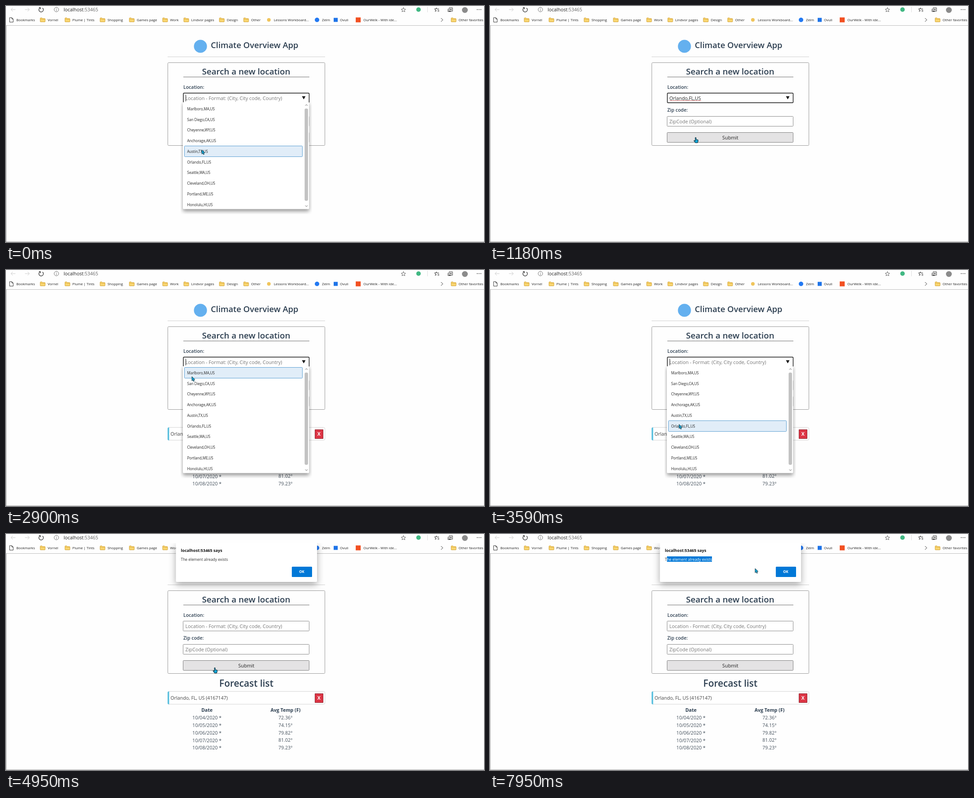
Write an HTML page with a canvas that moves like this. It is 1062 px wide and 527 px high and loops after 8000 ms.

```html
<!DOCTYPE html>
<html lang="en">
<head>
<meta charset="utf-8">
<title>Forecast search</title>
<style>
  html, body { margin: 0; width: 100%; height: 100%; overflow: hidden; background: #fefefe; }
  canvas { display: block; }
</style>
</head>
<body>
<canvas id="stage" width="1062" height="527"></canvas>
<script>
const ctx = document.getElementById('stage').getContext('2d');
const LOOP = 8000, STEP = 150;
const FONT = '"Open Sans", "Noto Sans", sans-serif';
const INK = '#2c3e50', DARK = '#222', BLUE = '#0078d7';

// Stretches of activity: the screen refreshes every STEP ms within each.
const bursts = [[150, 1180], [1330, 1450], [1730, 2750], [2900, 3320], [3590, 4400],
  [4680, 4950], [5510, 5900], [6180, 7140], [7260, 7950]];

// Pointer path: time, x, y
const path = [
  [0, 435, 321], [300, 433, 330], [450, 429, 343], [750, 428, 345], [900, 436, 332],
  [1050, 448, 309], [1180, 456, 294], [1450, 456, 294], [1730, 455, 291], [2180, 419, 221],
  [2480, 412, 206], [2750, 411, 205], [2900, 413, 238], [3200, 419, 330], [3320, 420, 344],
  [3740, 420, 345], [3890, 430, 335], [4190, 462, 301], [4400, 463, 299], [4950, 463, 299],
  [5510, 458, 255], [5660, 440, 150], [5810, 418, 80], [5900, 411, 60], [6180, 408, 59],
  [6480, 393, 57], [6630, 393, 57], [7140, 463, 57], [7410, 498, 58], [7860, 585, 76], [7950, 589, 77]
];

const cities = ['Marlboro,MA', 'San Diego,CA', 'Cheyenne,WY', 'Anchorage,AK', 'Austin,TX',
  'Orlando,FL', 'Seattle,WA', 'Cleveland,OH', 'Portland,ME', 'Honolulu,HI'];
const temps = ['72.36', '74.15', '79.82', '81.02', '79.23'];
const folders = [[76, 'Vornel'], [131, 'Plume | Tints'], [209, 'Shopping'], [274, 'Games page'],
  [348, 'Work'], [395, 'Lindvor pages'], [474, 'Design'], [528, 'Other'], [989, 'Other favorites']];

const within = (t, a, b) => t >= a && t < b;

function refreshTime(t) {
  let last = 0;
  for (const [start, end] of bursts) {
    if (t >= end) last = end;
    else if (t >= start) last = start + STEP * Math.floor((t - start) / STEP);
  }
  return last;
}

function pointerAt(t) {
  const i = path.findIndex(p => p[0] > t);
  if (i < 0) return path[path.length - 1].slice(1);
  const [t0, x0, y0] = path[i - 1], [t1, x1, y1] = path[i];
  const k = (t - t0) / (t1 - t0);
  return [x0 + (x1 - x0) * k, y0 + (y1 - y0) * k];
}

function text(s, x, y, size, color = DARK, weight = 400, align = 'left') {
  ctx.font = `${weight} ${size}px ${FONT}`;
  ctx.textAlign = align;
  ctx.textBaseline = 'alphabetic';
  ctx.fillStyle = color;
  ctx.fillText(s, x, y + size * 0.36);
}

function box(x, y, w, h, fill, stroke, radius = 0, line = 1) {
  ctx.beginPath();
  ctx.roundRect(x, y, w, h, radius);
  if (fill) { ctx.fillStyle = fill; ctx.fill(); }
  if (stroke) { ctx.strokeStyle = stroke; ctx.lineWidth = line; ctx.stroke(); }
}

function disc(x, y, r, color) {
  ctx.beginPath();
  ctx.arc(x, y, r, 0, Math.PI * 2);
  ctx.fillStyle = color;
  ctx.fill();
}

function shape(d, x, y, stroke, fill, line = 1) {
  const p = new Path2D(d);
  ctx.save();
  ctx.translate(x, y);
  if (fill) { ctx.fillStyle = fill; ctx.fill(p); }
  if (stroke) { ctx.strokeStyle = stroke; ctx.lineWidth = line; ctx.stroke(p); }
  ctx.restore();
}

function rule(x, y, w, color) {
  ctx.fillStyle = color;
  ctx.fillRect(x, y, w, 1);
}

function drawBrowser() {
  shape('M5 0H-5M-1 -4L-5 0L-1 4', 16, 8, '#ccc');
  shape('M-5 0H5M1 -4L5 0L1 4', 47, 8, '#ccc');
  shape('M3.2 -4A5 5 0 1 1 -2.8 -4.2M-5 -5H-1.5V-1.5', 78, 8.5, '#222', null, 1.2);
  shape('M-5 0a5 5 0 1 0 10 0a5 5 0 1 0 -10 0M0 -0.5V3M0 -3V-1.8', 112, 8, '#666', null, 0.9);
  text('localhost', 128, 8.5, 10.5, '#222');
  text(':53465', 128 + ctx.measureText('localhost').width, 8.5, 10.5, '#666');

  const star = 'M0 -5L1.5 -1.6L5 -1.3L2.3 1L3.2 4.5L0 2.6L-3.2 4.5L-2.3 1L-5 -1.3L-1.5 -1.6Z';
  shape(star, 883, 8.5, '#555', null, 0.9);
  disc(916.5, 8, 5, '#41b883');
  ctx.fillStyle = '#ddd';
  ctx.fillRect(936, 2, 1, 12);
  shape('M-1 -4L0 -1.4H5M-1 -4L-2 -1.4H-5L-2.5 0.5L-3.5 4L0 2M2 1.5H5.5M2 4H5.5', 957, 8, '#333');
  shape('M-5 -2V4H1M-2.5 -4.5H5V3H-2.5ZM1.2 -3V1.5M-1 -0.7H3.5', 987, 8.5, '#333');
  disc(1019.5, 9, 6.5, '#8b8b8b');
  for (const x of [1047, 1051, 1055]) disc(x, 8, 0.9, '#333');

  shape('M-4 -5H1L4 -2V5H-4ZM1 -5V-2H4', 12, 31, '#333');
  text('Bookmarks', 23, 31, 7.8);
  for (const [x, name] of folders) {
    shape('M0 1.5Q0 0 1 0H4L5.5 1.5H10Q11 1.5 11 2.5V8Q11 9 10 9H1Q0 9 0 8Z', x, 26.5, '#c99520', '#f8d570', 0.8);
    rule(x + 0.5, 29, 10, '#e3b347');
    text(name, x + 16.5, 31, 7.8);
  }
  disc(584, 31, 4, '#f0c55c');
  text('Lessons Workboard...', 595, 31, 7.8);
  disc(691, 31, 5, '#2379f2');
  text('Zelm', 702, 31, 7.8);
  box(728, 26.5, 9, 9, '#1f74e8');
  text('Ovuli', 742, 31, 7.8);
  box(777, 25.5, 11, 11, '#f25022');
  text('OurWelk - With ide...', 794, 31, 7.8);
  shape('M-2 -4L2 0L-2 4', 968.5, 31, '#333');

  rule(0, 43, 1062, '#bdbdbd');
  rule(0, 526, 1062, '#a8a8a8');
  ctx.fillStyle = '#a8a8a8';
  ctx.fillRect(0, 44, 1, 483);
}

function drawForm(state) {
  disc(432, 90, 14.5, '#64b0ef');
  text('Climate Overview App', 455, 87.5, 18.3, INK, 600);
  rule(359, 113, 350, '#cfcfcf');
  box(359.5, 126.5, 349, 185, null, '#999', 2);
  text('Search a new location', 533.5, 146.5, 18.7, INK, 600, 'center');
  rule(394, 158, 280, '#6d6d6d');

  text('Location:', 394, 181, 10.5, INK, 600);
  if (state.focus) box(394, 194.5, 279.5, 21.5, '#fff', '#111', 1.5, 1.4);
  else box(393.5, 194.5, 280, 22, '#fff', '#8a8a8a', 1);
  if (state.value) {
    text(state.value, 398.5, 206, 10.6, '#222');
    rule(399, 211, ctx.measureText(state.value).width, '#d86a6a');
  } else {
    text('Location - Format: (City, City code, Country)', 398.5, 206, 10.75, '#757575');
  }
  if (state.focus || state.overField) shape('M-4 -3.5H4L0 3.5Z', 661.5, 205, null, '#111');
  if (state.open) {
    ctx.fillStyle = '#222';
    ctx.fillRect(399, 198, 1, 15);
  }

  text('Zip code:', 394, 232.5, 10.5, INK, 600);
  box(393.5, 246.5, 280, 22, '#fff', '#8a8a8a', 1);
  text('ZipCode (Optional)', 398.5, 258, 10.75, '#757575');
  box(393.5, 282.5, 280, 22, state.pressed ? '#f3f3f3' : state.overButton ? '#e4e3e4' : '#efeeef', '#808080', 1);
  text('Submit', 534, 294, 10.8, '#222', 400, 'center');
}

function drawForecast() {
  text('Forecast list', 534, 333.5, 20.8, INK, 600, 'center');
  box(359.5, 351.5, 349, 28.5, '#fff', '#d4d4d4', 3);
  box(359, 351.5, 3.5, 29, '#5bc0de', null, [3, 0, 0, 3]);
  text('Orlando, FL, US (4167147)', 365.5, 366.5, 10.6, '#444');
  box(686.5, 356.5, 18, 20, '#dc3545', '#8e2832');
  text('X', 695.2, 366.5, 10.6, '#fff', 700, 'center');
  text('Date', 446.5, 393.5, 10.6, INK, 700, 'center');
  text('Avg Temp (F)', 621, 393.5, 10.6, INK, 700, 'center');
  temps.forEach((temp, i) => {
    const y = 410.3 + i * 16.8;
    text(`10/0${i + 4}/2020 *`, 446.5, y, 10.6, '#44505c', 400, 'center');
    text(temp + '°', 621, y, 10.5, '#44505c', 400, 'center');
  });
}

function castShadow(color, blur, offset, draw) {
  ctx.save();
  ctx.shadowColor = color;
  ctx.shadowBlur = blur;
  ctx.shadowOffsetY = offset;
  draw();
  ctx.restore();
}

function drawOptions(y) {
  ctx.save();
  ctx.beginPath();
  ctx.rect(388, 215, 292, 250);
  ctx.clip();
  castShadow('rgba(0,0,0,.4)', 8, 5, () => box(393, 213, 280.5, 240.5, '#fff', null, 2));
  const hovered = Math.floor((y - 218.2) / 23.75);
  cities.forEach((city, i) => {
    const mid = 230 + i * 23.75;
    if (i === hovered) box(396.5, Math.round(mid) - 12.5, 262, 24, '#e1edf8', '#5b9fd2', 1);
    text(city + ',US', 402.5, mid, 8.05, '#222');
  });
  ctx.restore();
  box(663.5, 229, 7.5, 206, '#c2c2c2', null, 3);
  shape('M-2.5 1.5L0 -1L2.5 1.5', 667.5, 221, '#555');
  shape('M-2.5 -1.5L0 1L2.5 -1.5', 667.5, 447, '#555');
}

function drawAlert(t, x) {
  const message = 'The element already exists', left = 388.5;
  ctx.save();
  ctx.globalAlpha = t < 4830 ? 0.6 : t < 4950 ? 0.95 : 1;
  ctx.beginPath();
  ctx.rect(360, 20, 345, 110);
  ctx.clip();
  castShadow('rgba(0,0,0,.34)', 16, 6, () => box(377.5, 20, 313.5, 87, '#fff', null, [0, 0, 2, 2]));
  text('localhost:53465 says', left, 37, 9.1, '#111', 700);
  text(message, left, 57, 8.45, '#333');
  if (t > 6630) {
    let chars = 1;
    const edge = n => left + ctx.measureText(message.slice(0, n)).width;
    while (chars < message.length && (edge(chars) + edge(chars + 1)) / 2 < x) chars++;
    const from = edge(1);
    ctx.beginPath();
    ctx.rect(from, 50, edge(chars) - from, 12);
    ctx.clip();
    ctx.fillStyle = BLUE;
    ctx.fillRect(380, 50, 130, 12);
    text(message, left, 57, 8.45, '#fff');
  }
  ctx.restore();
  ctx.save();
  ctx.globalAlpha = t < 4830 ? 0.6 : 1;
  box(635, 73, 45, 23, BLUE, null, 1.5);
  text('OK', 657, 84.5, 8, '#fff', 700, 'center');
  ctx.restore();
}

function drawPointer(kind, x, y) {
  if (kind === 'hand') {
    shape('M0 0Q1.5 -1 2 1V4L6 5Q7 6 6 9L5 11.5H0.5L-3 7Q-2.5 5.5 0 7Z', x, y, '#17323d', '#12a5d6', 1.1);
  } else if (kind === 'beam') {
    shape('M-2.5 -4.5H2.5M0 -4.5V4.5M-2.5 4.5H2.5', x, y, '#173f5c', null, 1.7);
  } else {
    shape('M0 0V9.5L2.2 7.6L3.8 10.8L5.4 10L4 6.9L6.8 6.6Z', x, y, '#17323d', '#12a5d6', 0.9);
  }
}

function frame(now) {
  const t = refreshTime(now % LOOP);
  const [x, y] = pointerAt(t);
  const alertOpen = t >= 4680;
  const inside = (l, top, r, bottom) => x > l && x < r && y > top && y < bottom;
  const overField = inside(394, 194, 674, 216);
  const overButton = inside(394, 282, 674, 305);
  const open = within(t, 0, 750) || within(t, 2630, 3740);
  const picked = within(t, 750, 1450) || within(t, 3740, 4400);

  ctx.fillStyle = '#fefefe';
  ctx.fillRect(0, 0, 1062, 527);
  drawBrowser();
  drawForm({
    open, overField,
    focus: t < 1330 || within(t, 2630, 4340),
    value: picked ? 'Orlando,FL,US' : '',
    overButton: (overButton && !open) || alertOpen,
    pressed: within(t, 1330, 1450) || within(t, 4340, 4400)
  });
  if (t >= 1730) drawForecast();
  if (open) drawOptions(y);
  if (alertOpen) drawAlert(t, x);

  const overMessage = alertOpen && inside(388, 50, 497, 64);
  const kind = overButton && !open ? 'hand' : overField || overMessage ? 'beam' : 'arrow';
  drawPointer(kind, x, y);
  requestAnimationFrame(frame);
}
requestAnimationFrame(frame);
</script>
</body>
</html>
```
